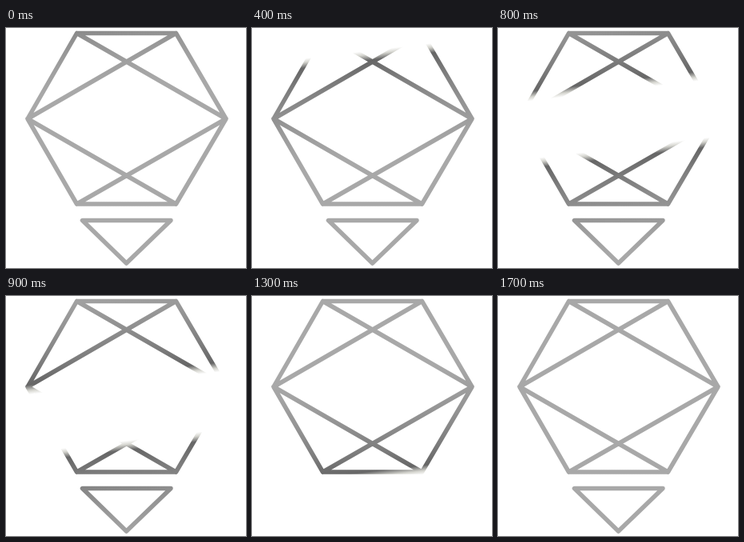
Write an HTML page that moves like this. It is 300 px wide and 300 px high and loops after 2.1 s.

```html
<!DOCTYPE html>
<html lang="en">
<head>
<meta charset="utf-8">
<title>Shining gem</title>
<style>
  html, body { margin: 0; width: 100%; height: 100%; overflow: hidden; background: #fff; }
  svg { display: block; width: 100%; height: 100%; }
</style>
</head>
<body>
<svg viewBox="0 0 300 300">
  <defs>
    <linearGradient id="shine" gradientUnits="userSpaceOnUse" x1="0" x2="0"></linearGradient>
  </defs>
  <path fill="none" stroke="url(#shine)" stroke-width="5.5" stroke-linejoin="round" stroke-linecap="round"
    d="M88.5 6.5H212.5L275 113.5L212.5 220H88.5L27 113.5Z
       M212.5 6.5L27 113.5L212.5 220 M88.5 6.5L275 113.5L88.5 220
       M95.5 240.5H206L150.5 294Z"/>
</svg>
<script>
const LOOP = 2100, STEP = 100, LAST = 16;
const SPEED = 30.6, START = -100, SLOPE = -6.8;
const HALF = 38, REACH = 170;

// Distance from the centre of the white band, and the grey found there.
const tones = [
  [HALF - 2, '#fff'], [HALF + 3, '#d6d6d0'], [HALF + 10, '#666'],
  [HALF + 35, '#7c7c7c'], [HALF + 70, '#919191'],
  [HALF + 105, '#a0a0a0'], [REACH, '#a8a8a8'],
];

const shine = document.getElementById('shine');
shine.setAttribute('y1', -REACH);
shine.setAttribute('y2', REACH);

function addStop(position, color) {
  const stop = document.createElementNS(shine.namespaceURI, 'stop');
  stop.setAttribute('offset', (position + REACH) / (2 * REACH));
  stop.setAttribute('stop-color', color);
  shine.append(stop);
}
[...tones].reverse().forEach(([d, color]) => addStop(-d, color));
tones.forEach(([d, color]) => addStop(d, color));

function draw(now) {
  const t = now % LOOP;
  const step = Math.min(LAST, Math.max(0, Math.floor(t / STEP) - 1));
  // The band leaves the picture entirely on the last step.
  const y = step === LAST ? 600 : START + SPEED * step;
  shine.setAttribute('gradientTransform', `translate(150 ${y}) skewY(${SLOPE})`);
  requestAnimationFrame(draw);
}
draw(performance.now());
</script>
</body>
</html>
```
